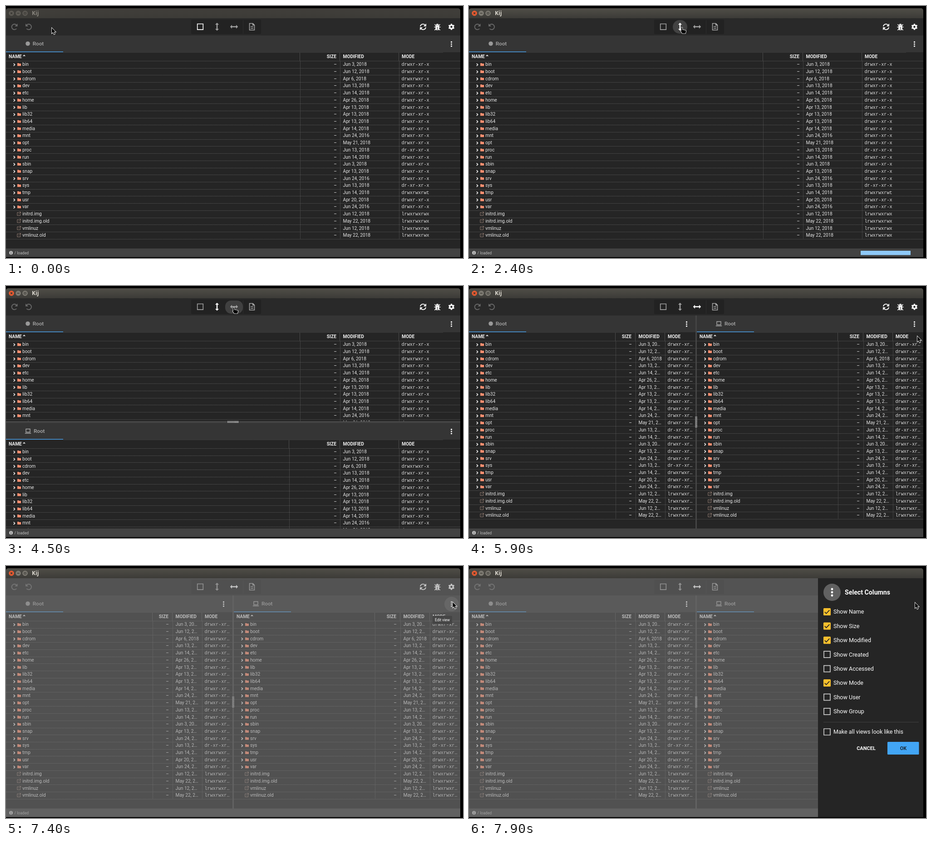
Recreate the animation shown at these times as an HTML page with a canvas. Size 1007 px wide and 556 px high, loop 8000 ms.

```html
<!DOCTYPE html>
<html lang="en">
<head>
<meta charset="utf-8">
<title>File manager</title>
<style>
html, body { margin: 0; width: 100%; height: 100%; overflow: hidden; background: #000; }
canvas { display: block; }
</style>
</head>
<body>
<canvas id="stage" width="1007" height="556"></canvas>
<script>
const ctx = document.getElementById('stage').getContext('2d');
const LOOP = 8000, STEP = 100, RIGHT = 1001;
const SANS = 'Roboto, sans-serif', MONO = '"Liberation Mono", monospace';

const files = `bin|Jun 3, 2018
boot|Jun 12, 2018
cdrom|Apr 6, 2018|drwxrwxr-x
dev|Jun 13, 2018
etc|Jun 14, 2018
home|Apr 26, 2018
lib|Apr 13, 2018
lib32|Apr 13, 2018
lib64|Apr 13, 2018
media|Apr 14, 2018
mnt|Jun 24, 2016
opt|May 21, 2018
proc|Jun 13, 2018|dr-xr-xr-x
run|Jun 14, 2018
sbin|Jun 3, 2018
snap|Apr 13, 2018
srv|Jun 24, 2016
sys|Jun 13, 2018|dr-xr-xr-x
tmp|Jun 14, 2018|drwxrwxrwt
usr|Apr 20, 2018
var|Jun 24, 2016
initrd.img|Jun 12, 2018|lrwxrwxrwx
initrd.img.old|May 22, 2018|lrwxrwxrwx
vmlinuz|Jun 12, 2018|lrwxrwxrwx
vmlinuz.old|May 22, 2018|lrwxrwxrwx`.split('\n').map(line => line.split('|'));

const options = ['Name', 'Size', 'Modified', 'Created', 'Accessed', 'Mode', 'User', 'Group'];
const checked = ['Name', 'Size', 'Modified', 'Mode'];

// Pointer path: time, x, y
const pointer = [
  [100, 101, 48.5], [400, 260, 104], [600, 400, 111], [800, 516, 80], [1000, 484, 50],
  [1100, 484, 50], [1300, 469, 48], [3400, 469, 48], [3500, 491, 48], [3600, 491, 48],
  [4000, 502, 48], [5100, 502, 48], [5300, 400, 190], [5500, 60, 468], [5700, 560, 300],
  [5900, 988, 111], [6000, 990, 112], [6200, 990, 112], [6300, 993, 104], [6500, 984.5, 80],
  [7800, 984.5, 80], [7900, 983, 81]
];

function rect(x, y, w, h, color, radius = 0) {
  ctx.fillStyle = color;
  ctx.beginPath();
  ctx.roundRect(x, y, w, h, radius);
  ctx.fill();
}

function disc(x, y, r, color) {
  ctx.fillStyle = color;
  ctx.beginPath();
  ctx.arc(x, y, r, 0, 7);
  ctx.fill();
}

// Text is centred on its capital height at y
function text(str, x, y, size, color, { weight = 400, align = 'left', family = SANS, max = 0 } = {}) {
  ctx.font = `${weight} ${size}px ${family}`;
  ctx.textAlign = align;
  ctx.fillStyle = color;
  if (max && ctx.measureText(str).width > max) {
    while (ctx.measureText(str + '…').width > max) str = str.slice(0, -1);
    str += '…';
  }
  ctx.fillText(str, x, y + size * 0.355);
}

// Fills the path, or strokes it when a width is given
function icon(d, x, y, color, width = 0, turn = 0, flip = 1) {
  ctx.save();
  ctx.translate(x, y);
  ctx.rotate(turn);
  ctx.scale(flip, 1);
  ctx.fillStyle = ctx.strokeStyle = color;
  ctx.lineWidth = width;
  const path = new Path2D(d);
  if (width) ctx.stroke(path); else ctx.fill(path);
  ctx.restore();
}

function line(x1, y1, x2, y2, color, dash = []) {
  ctx.strokeStyle = color;
  ctx.lineWidth = 1;
  ctx.setLineDash(dash);
  ctx.beginPath();
  ctx.moveTo(x1, y1);
  ctx.lineTo(x2, y2);
  ctx.stroke();
  ctx.setLineDash([]);
}

function kebab(x, y, gap, r) {
  for (const i of [-1, 0, 1]) disc(x, y + i * gap, r, '#fff');
}

function titleBar(active) {
  const grad = ctx.createLinearGradient(0, 5, 0, 27);
  grad.addColorStop(0, active ? '#504e48' : '#413f3b');
  grad.addColorStop(1, '#3c3b37');
  rect(0, 5, RIGHT, 22, grad, [5, 5, 0, 0]);
  const ring = active ? '#7d7a72' : '#5d5a54', mark = '#35332f';
  disc(12, 16, 5.8, active ? '#ea5b31' : ring);
  disc(27, 16, 5.8, ring);
  disc(42, 16, 5.8, ring);
  icon('M-2-2L2 2M-2 2L2-2', 12, 16, mark, 1.3);
  icon('M-2.5 0H2.5', 27, 16, mark, 1.3);
  icon('M-2-2H2V2H-2z', 42, 16, mark, 1.2);
  text('Kij', 57, 16, 12, active ? '#dfdbd2' : '#8b8880', { weight: 700, family: '"Open Sans", sans-serif' });
}

function toolbar(mode, t) {
  rect(0, 27, RIGHT, 38, '#292929');
  const redo = 'M4.6 4A6 6 0 1 1 4.4-4.1', head = 'M7-7.2V-1H.8z';
  for (const [x, flip] of [[18.5, 1], [50, -1]]) {
    icon(redo, x, 46, '#686868', 1.9, 0, flip);
    icon(head, x, 46, '#686868', 0, 0, flip);
  }
  rect(408, 30, 154, 32, '#222', 2);

  if (t >= 2000 && t < 3500) {
    const w = Math.min(32, 16 + (t - 2000) / 20);
    rect(465 - w / 2, 31, w, 30, '#424242', 15);
  }
  if (t >= 4200 && t < 5000) {
    const w = Math.min(39, 20 + (t - 4200) / 12);
    rect(502.5 - w / 2, 32, w, 29, '#404040', 13);
  }

  const tone = i => mode === i ? '#fff' : '#a0a0a0';
  const arrows = 'M0-8.7L4.2-4.6H1.2V4.6H4.2L0 8.7-4.2 4.6H-1.2V-4.6H-4.2z';
  icon('M-6.3-6.3H6.3V6.3H-6.3z', 428, 45.8, tone(0), 1.6);
  icon(arrows, 465, 45.8, tone(1));
  icon(arrows, 502.5, 45.8, tone(2), 0, Math.PI / 2);
  line(522.5, 31, 522.5, 61, '#2d2d2d');
  icon('M-5.5-7.2H2L5.5-3.8V7.2H-5.5zM1.8-7.2V-3.6H5.5M-3-.4H3M-3 3.4H3', 542, 45.8, '#aaa', 1.5);

  icon('M-6-1A6 6 0 0 1 4.6-3.8M6 1A6 6 0 0 1-4.6 3.8', 919, 46, '#fff', 1.9);
  icon('M7-7.2V-1H.8zM-7 7.2V1H-.8z', 919, 46, '#fff');
  icon('M-7 0H7M-6-6L-3-3H3L6-6M-6 7L-3 3.5H3L6 7', 950.5, 46.5, '#fff', 1.5);
  icon('M-3-4A3 3.2 0 0 1 3-4zM-4-3H4V3A4 4.2 0 0 1-4 3z', 950.5, 46.5, '#fff');
  line(950.5, 46, 950.5, 54, '#292929');
  icon('M0-6.8V6.8M-5.9-3.4L5.9 3.4M-5.9 3.4L5.9-3.4', 981.5, 46, '#fff', 3.2);
  disc(981.5, 46, 5.2, '#fff');
  disc(981.5, 46, 2.3, '#292929');
}

function pane(x, y, w, h, { laptop = false, narrow = false, split }) {
  const r = x + w, dots = [0.785, 0.785], grid = '#606060';
  const [sizeEnd, modLine, modX, modeLine, modeX] =
    (narrow ? [140, 132, 125, 67, 61] : [272, 265, 258, 135, 129]).map(d => r - d);
  const bold = { weight: 700 };
  ctx.save();
  ctx.beginPath();
  ctx.rect(x, y, w, h);
  ctx.clip();

  rect(x, y, w, h, '#252525');
  rect(x, y, w, 37, '#353535');
  if (laptop) {
    icon('M-4.5-4.5H4.5V2.5H-4.5zM-6.7 5H6.7', x + 48.5, y + 18, '#aaa', 1.4);
  } else {
    disc(x + 48, y + 18, 4.8, '#999');
  }
  text('Root', x + (laptop ? 61 : 58.7), y + 18.2, 11.7, '#aaa', { weight: 500 });
  rect(x, y + 35.4, 126, 1.6, '#4a9fe8');
  kebab(r - 19.5, y + 19, 4.6, 1.6);

  const headY = y + 46.5, top = y + 56.5, pitch = 15.708;
  line(x + 126, y + 37.5, r - 38, y + 37.5, '#3a3a3a');
  text('NAME', x + 6, headY, 10.2, '#eee', bold);
  icon('M-3.2 1.6L0-1.5 3.2 1.6z', x + 40, headY - 2.5, '#eee');
  text('SIZE', sizeEnd - 1, headY, 10.2, '#eee', { ...bold, align: 'right' });
  text('MODIFIED', modX - 0.5, headY, 10.2, '#eee', bold);
  text('MODE', modeX, headY, 10.2, '#eee', bold);
  line(x, top, r, top, grid, dots);
  for (const sep of [r - split, modLine, modeLine]) {
    line(sep - 0.5, y + 38, sep - 0.5, top, '#4c4c4c');
    line(sep + 0.5, top, sep + 0.5, top + 25 * pitch, grid, dots);
  }

  files.forEach(([name, date, mode = 'drwxr-xr-x'], i) => {
    const cy = y + 63.7 + i * pitch;
    const bottom = Math.round(top + (i + 1) * pitch - 0.5) + 0.5;
    if (mode[0] === 'l') {
      icon('M0-3H-3.7V3.7H3V0M.5-4H4V-.5M4-4L-1 1', x + 28.5, cy, '#8f7a70', 1);
    } else {
      icon('M-1.3-2.8L1.5 0-1.3 2.8', x + 18, cy + 0.8, '#fff', 1.5);
      icon('M-4-3H-1L0-2H4V3.2H-4z', x + 29, cy + 0.3, '#fc8f70');
    }
    text(name, x + 36, cy, 10.2, '#e8e8e8');
    text('–', sizeEnd, cy, 10.2, '#e8e8e8', { align: 'right' });
    text(date, modX - 0.5, cy, 10.2, '#e8e8e8', { max: narrow ? 52 : 0 });
    text(mode, modeX - 0.5, cy, 10.2, '#e0e0e0', { family: MONO, max: narrow ? 56 : 0 });
    line(x, bottom, r, bottom, grid, dots);
  });
  ctx.restore();
}

function grip(x, y, vertical) {
  for (let i = 0; i < 8; i++) {
    for (const side of [0, 2.5]) {
      const along = i * 3.1;
      rect(x + (vertical ? side : along), y + (vertical ? along : side), 1.6, 1.6, '#eee');
    }
  }
}

function panes(layout) {
  rect(0, 65, RIGHT, 470, '#444');
  if (layout === 0) {
    pane(0, 65, RIGHT, 470, { split: 353 });
  } else if (layout === 1) {
    pane(0, 65, RIGHT, 233, { split: 353 });
    pane(0, 302, RIGHT, 233, { split: 377, laptop: true });
    grip(488.5, 297.8, false);
  } else {
    pane(0, 65, 499, 470, { split: 176, narrow: true });
    pane(502, 65, 499, 470, { split: 188, narrow: true, laptop: true });
    grip(498.5, 288.5, true);
  }
}

function statusBar(busy) {
  rect(0, 535, RIGHT, 19, '#424242');
  disc(11, 544.5, 4, '#c4c4c4');
  rect(10.4, 544, 1.3, 3, '#424242');
  rect(10.4, 542, 1.3, 1.2, '#424242');
  text('/ loaded', 18.5, 544.8, 8.6, '#bbb');
  if (busy) rect(863, 540, 110, 9.5, '#8ec9f8');
}

function tooltip(color) {
  rect(940, 110, 43, 18, color, 1.5);
  text('Edit view', 961.5, 119, 8.3, '#fff', { align: 'center' });
}

function checkbox(label, x, y, on) {
  if (on) {
    rect(x, y - 8, 16, 16, '#fbc02d', 1.5);
    icon('M-5.2.3L-1.8 3.8 5.4-3.6', x + 8, y, '#252525', 1.8);
  } else {
    icon('M-7-7H7V7H-7z', x + 8, y, '#c8c8c8', 1.7);
  }
  text(label, x + 22, y, 12.55, '#fff');
}

function drawer(x) {
  ctx.save();
  ctx.beginPath();
  ctx.rect(0, 27, RIGHT, 527);
  ctx.clip();
  rect(x, 27, 232, 527, '#252525');
  disc(x + 31, 58, 19, '#616161');
  kebab(x + 31, 58, 7, 2.4);
  text('Select Columns', x + 59, 58, 14.2, '#fff', { weight: 700 });
  options.forEach((name, i) => checkbox('Show ' + name, x + 12, 101 + i * 31.4, checked.includes(name)));
  line(x + 12, 344.5, x + 222, 344.5, '#424242');
  checkbox('Make all views look like this', x + 12, 366, false);
  text('CANCEL', x + 106, 402, 11, '#fff', { weight: 700, align: 'center' });
  rect(x + 153, 388, 69.5, 28, '#42a5f5', 1.5);
  text('OK', x + 188, 402, 11, '#1c2a36', { weight: 700, align: 'center' });
  ctx.restore();
}

function cursor(t) {
  const i = pointer.findIndex(key => key[0] >= t);
  const b = pointer[i], a = pointer[i - 1] || b;
  const p = a === b ? 0 : (t - a[0]) / (b[0] - a[0]);
  const x = a[1] + (b[1] - a[1]) * p, y = a[2] + (b[2] - a[2]) * p;
  const shape = t >= 1800 && t < 5200
    ? 'M-1.2 0Q0-1.4 1.2 0V4.5L8 5.8Q9.3 6 9 8L8 12.5H1L-2 8Q-2.5 6.5-1.2 6.5z'
    : 'M0 0V11.8L2.7 9.3 4.8 14 6.7 13.1 4.7 8.6H8.3z';
  icon(shape, x, y, '#fff', 1.7);
  icon(shape, x, y, '#000');
}

function draw(t) {
  const layout = t < 3500 ? 0 : t < 4600 ? 1 : 2;
  const mode = t < 2200 ? 0 : t < 4600 ? 1 : 2;
  ctx.fillStyle = '#000';
  ctx.fillRect(0, 0, 1007, 556);
  titleBar(t >= 2000);
  toolbar(mode, t);
  panes(layout);
  statusBar(t >= 2300 && t < 3500);

  if (t >= 6400) {
    disc(982, 84, t >= 7400 ? 16 : 13, '#4d4d4d');
    kebab(981.5, 84, 4.6, 1.6);
  }
  if (t >= 7400) rect(0, 27, RIGHT, 527, 'rgba(130,130,130,.48)');
  if (t >= 6800 && t < 7500) tooltip(t >= 7400 ? '#454545' : '#5c5c5c');
  if (t >= 7500) {
    const p = Math.min(1, (t - 7400) / 400);
    drawer(RIGHT - 232 * (1 - (1 - p) ** 4));
  }
  cursor(t);
}

function tick(now) {
  draw(Math.floor((now % LOOP) / STEP) * STEP);
  requestAnimationFrame(tick);
}
requestAnimationFrame(tick);
</script>
</body>
</html>
```
